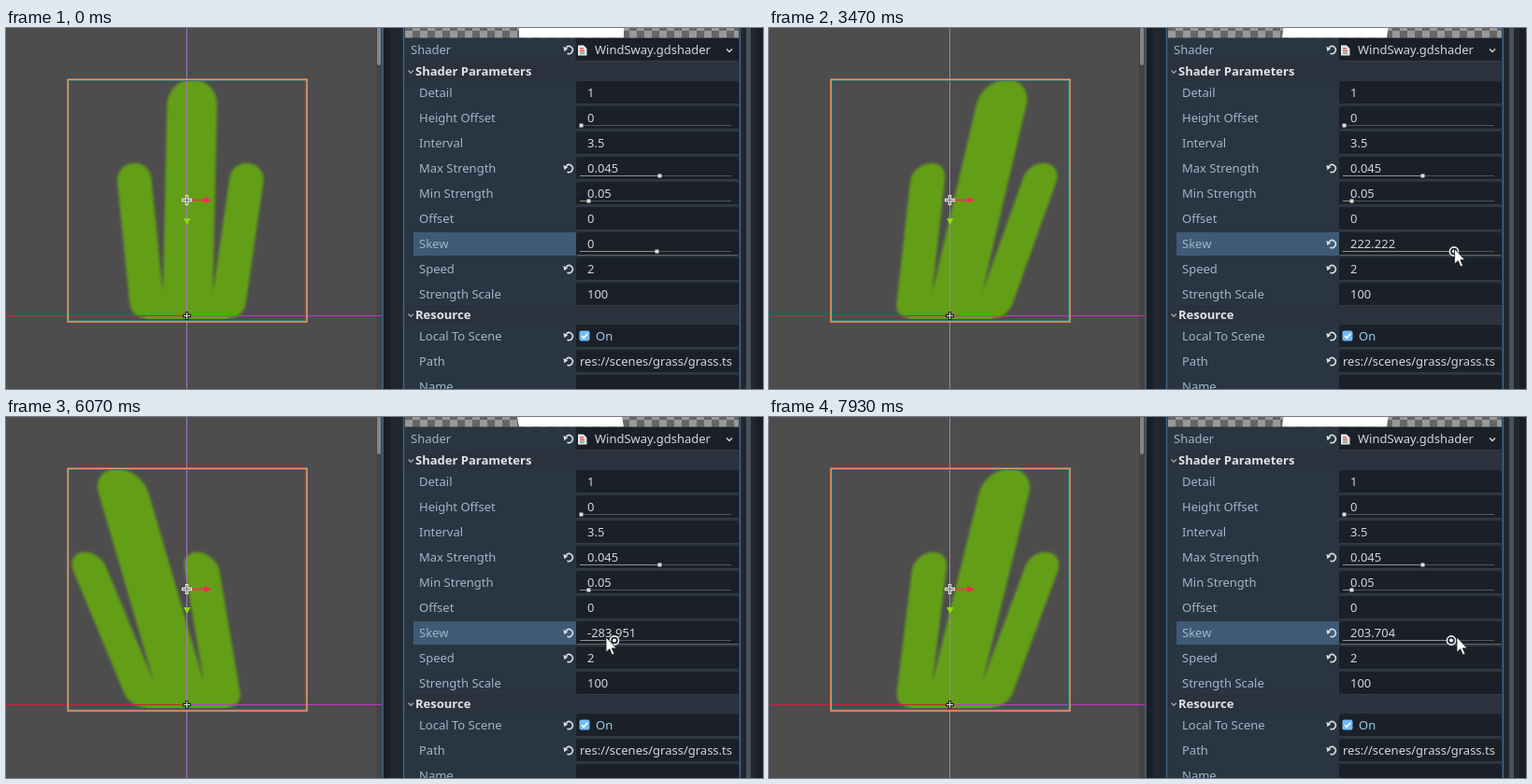
An HTML page that plays this animation: 810 px wide and 387 px high, repeating every 8 s.

```html
<!DOCTYPE html>
<html lang="en">
<head>
<meta charset="utf-8">
<title>Skew slider</title>
<style>
  html, body { margin: 0; width: 100%; height: 100%; overflow: hidden; background: #1f242c; }
  svg { display: block; }
  text { font: 13px "Noto Sans", "Open Sans", sans-serif; white-space: pre; }
  .label { fill: #a0b6c9; }
  .value { fill: #d3d6da; }
  .head { fill: #e0e3e7; font-weight: bold; }
  .field { fill: #1b2028; }
  .icon { fill: none; stroke: #dcdfe3; stroke-width: 1.6; }
  .chevron { fill: none; stroke: #9aa2ac; stroke-width: 1.4; }
</style>
</head>
<body>
<svg width="810" height="387" viewBox="0 0 810 387">
  <defs>
    <filter id="soft" filterUnits="userSpaceOnUse" x="-40" y="30" width="480" height="310">
      <feGaussianBlur stdDeviation="1.4"/>
    </filter>
    <clipPath id="frame"><rect y="55" width="397" height="257"/></clipPath>
    <clipPath id="thumb"><rect x="427" width="357" height="10.5"/></clipPath>
    <pattern id="checks" width="16" height="16" x="427" y="3" patternUnits="userSpaceOnUse">
      <rect width="16" height="16" fill="#666"/>
      <path d="M0 0h8v8h-8zM8 8h8v8h-8z" fill="#999"/>
    </pattern>
    <g id="reset">
      <path class="icon" d="M-2.6 -2.6A4 4 0 1 1 -1.5 3.7"/>
      <path d="M-5.6 -3.4L-.6 -1.6L-4.6 1.8Z" fill="#dcdfe3"/>
    </g>
  </defs>

  <!-- viewport -->
  <rect width="402" height="387" fill="#4d4d4d"/>
  <g clip-path="url(#frame)"><g filter="url(#soft)">
    <g id="plant" fill="#649f17" stroke="#649f17" stroke-linecap="round">
      <path d="M194 82V284" stroke-width="53.5"/>
      <path d="M134 163L150 293M254 163L238 293" stroke-width="36.5"/>
      <path d="M150 286h88v28h-88z" stroke="none"/>
    </g>
  </g></g>
  <rect x="396" width="6" height="387" fill="#444"/>
  <rect x="397" y="-6" width="4" height="46" rx="2" fill="#858585"/>
  <path d="M193.5 0V387" stroke="#a878c0"/>
  <path d="M0 308.5H193" stroke="#d8173f"/>
  <path d="M194 308.5H402" stroke="#c235c4"/>
  <rect x="67.5" y="56.5" width="253" height="257" fill="none" stroke="#2f7775"/>
  <rect x="66.2" y="55.2" width="255.8" height="259.8" fill="none" stroke="#ee9a63" stroke-width="1.5"/>
  <path d="M198 184.5H213" stroke="#f72a50" stroke-width="1.6"/>
  <path d="M212 181L220 184.5L212 188Z" fill="#f72a50"/>
  <path d="M190 204H197.4L193.7 211Z" fill="#8edc12"/>
  <path d="M193.5 179V190M188 184.5H199" stroke="#e4e4e4" stroke-width="3.4"/>
  <path d="M193.5 180V189M189 184.5H198" stroke="#777" stroke-width="1.2"/>
  <path d="M193.5 304V313M189 308.5H198" stroke="#222" stroke-width="3.4"/>
  <path d="M193.5 305V312M190 308.5H197" stroke="#ddd" stroke-width="1.2"/>

  <!-- inspector frame -->
  <path d="M403 0V387" stroke="#456b89" stroke-width="1.6"/>
  <rect x="404" width="7" height="387" fill="#1a1e25"/>
  <rect x="411" width="14" height="387" fill="#21272f"/>
  <rect x="425" width="361" height="387" fill="#293541"/>
  <path d="M425.5 0V387M785.5 0V387" stroke="#3e678a" stroke-width="1.4"/>
  <rect x="787" width="16" height="387" fill="#21272f"/>
  <rect x="792" width="5" height="387" fill="#4b5159"/>
  <rect x="803" width="7" height="387" fill="#1a1e25"/>
  <g clip-path="url(#thumb)">
    <rect x="427" width="357" height="11" fill="url(#checks)"/>
    <rect id="quad" x="549" y="-20" width="112" height="30.5" fill="#fff"/>
  </g>

  <g id="rows"></g>
  <rect x="609.5" y="10.5" width="1" height="26" fill="#20262e"/>
  <path d="M612 18.5h6l3.5 3.5v7.5h-9.5z" fill="#e4e6e8"/>
  <path d="M614 22h4M614 24.5h5" stroke="#e0524f" stroke-width="1.4"/>
  <path d="M614 27h5" stroke="#4fae5b" stroke-width="1.4"/>
  <path class="chevron" d="M771 22.5l3 3l3 -3" style="stroke:#d3d6da"/>
  <rect x="613.5" y="324.5" width="11" height="11" rx="2" fill="#70bafa"/>
  <path d="M616 330.2l2.2 2.2l4 -4.6" fill="none" stroke="#fff" stroke-width="1.7"/>

  <!-- live slider parts -->
  <use id="skewReset" href="#reset" x="602" y="231.5"/>
  <text id="skewText" class="value" x="622" y="236">0</text>
  <path d="M614 239.5H776" stroke="#50555d"/>
  <path id="fill" stroke="#8d9299"/>
  <rect id="knob" x="694.5" y="237.5" width="4" height="4" fill="#dcdcdc"/>
  <g id="ring">
    <circle r="4.6" fill="#1b2028" stroke="#f0f0f0" stroke-width="1.6"/>
    <circle r="2.1" fill="#f0f0f0"/>
  </g>
  <path id="cursor" d="M0 0V16.2L3.7 12.8L6.4 19L9 17.9L6.3 11.9H11.2Z"
        fill="#fff" stroke="#222" stroke-width=".9" stroke-linejoin="round"/>
</svg>
<script>
const $ = id => document.getElementById(id);

// label, centre y, value, has reset arrow, slider handle x
const ROWS = [
  ['Detail', 69, '1'],
  ['Height Offset', 96, '0', 0, 615],
  ['Interval', 123, '3.5'],
  ['Max Strength', 150, '0.045', 1, 699],
  ['Min Strength', 177, '0.05', 0, 623],
  ['Offset', 204, '0'],
  ['Skew', 231, ''],
  ['Speed', 258, '2', 1],
  ['Strength Scale', 285, '100'],
  ['Local To Scene', 330, 'On', 1],
  ['Path', 357, 'res://scenes/grass/grass.ts', 1],
  ['Name', 384, '']
];

const text = (cls, x, y, s, extra = '') =>
  `<text class="${cls}" x="${x}" y="${y + 5}" ${extra}>${s}</text>`;

const field = (y, line = '#363c45') =>
  `<rect class="field" x="610" y="${y - 12}" width="174" height="25" rx="2.5"/>
   <path d="M611 ${y + 12.5}H783" stroke="${line}"/>`;

const reset = y => `<use href="#reset" x="602" y="${y + .5}"/>`;

const slider = (x, y) =>
  `<path d="M614 ${y}H776" stroke="#50555d"/><path d="M614 ${y}H${x}" stroke="#8d9299"/>
   <rect x="${x - 1.5}" y="${y - 2}" width="4" height="4" fill="#dcdcdc"/>`;

const section = (name, y) =>
  `<rect x="427" y="${y - 10}" width="357" height="20" fill="#2b323e"/>
   <path class="chevron" d="M430.5 ${y - .5}l2.7 2.7l2.7 -2.7"/>` + text('head', 438, y, name);

function row([name, y, value, changed, handle]) {
  const skew = name === 'Skew';
  const valueX = name === 'Path' ? 614 : name === 'Local To Scene' ? 631 : 622;
  return (skew ? '<rect x="436" y="219" width="174" height="25" fill="#3e5a75"/>' : '') +
    field(y, skew ? '#6a625f' : undefined) +
    text('label', 442, y, name) +
    text('value', valueX, y, value, value === 'On' ? 'style="fill:#9acdf3"' : '') +
    (changed ? reset(y) : '') +
    (handle ? slider(handle, y + 8.5) : '');
}

$('rows').innerHTML = field(23) + text('label', 433, 23, 'Shader') + reset(23) +
  text('value', 630, 23, 'WindSway.gdshader') +
  section('Shader Parameters', 46) + section('Resource', 307) + ROWS.map(row).join('');

const POINTER_X = [
  [1270, 540], [1400, 549], [1800, 662], [2070, 691], [2600, 695], [2700, 696], [2930, 707],
  [3800, 744], [4600, 751], [4667, 756], [4867, 755], [5533, 722], [6000, 649], [6067, 642],
  [6333, 621], [6733, 620], [6800, 619], [7000, 616], [7267, 625], [7867, 728], [7933, 736]
];
const POINTER_Y = [[1270, 230.5], [2070, 236], [2600, 236], [4667, 238], [6067, 236], [6800, 235], [7933, 236]];

// Monotone cubic through [time, value] points
function curve(points, t) {
  const last = points.length - 1;
  if (t <= points[0][0]) return points[0][1];
  if (t >= points[last][0]) return points[last][1];
  const rate = i => (points[i + 1][1] - points[i][1]) / (points[i + 1][0] - points[i][0]);
  const slope = i => {
    if (i === 0 || i === last) return 0;
    const a = rate(i - 1), b = rate(i);
    return a * b > 0 ? 2 * a * b / (a + b) : 0;
  };
  const i = points.findIndex(p => p[0] > t) - 1;
  const [t0, v0] = points[i], [t1, v1] = points[i + 1];
  const d = t1 - t0, u = (t - t0) / d, w = 1 - u;
  return w * w * (1 + 2 * u) * v0 + u * u * (3 - 2 * u) * v1 +
    d * u * w * (w * slope(i) - u * slope(i + 1));
}

const LOOP = 8000, STEP = 1000 / 15;

function shear(id, slope, base) {
  $(id).setAttribute('transform', `matrix(1 0 ${-slope} 1 ${slope * base} 0)`);
}

function draw(ms) {
  // 15 steps a second, with a stall early on
  let step = Math.floor((ms + 3.4) / STEP);
  if (step > 2 && step < 19) step = 2;
  if (step === 20) step = 19;
  const t = step * STEP;

  const x = curve(POINTER_X, t), y = curve(POINTER_Y, t);
  const pull = t < 2690 ? 0 : Math.round(curve(POINTER_X, t - STEP) - 695);
  const skew = pull * 1000 / 162;
  const shift = 25.5 * Math.sin(t / 500 + 2.92) + .322 * skew;

  shear('plant', shift / 260, 315);
  shear('quad', shift / 430, 10.5);

  const pointing = step >= 19, hover = pointing && x > 612;
  const show = (id, on) => $(id).setAttribute('visibility', on ? 'visible' : 'hidden');
  show('cursor', pointing);
  show('ring', hover);
  show('knob', !hover);
  show('skewReset', pull !== 0);
  $('skewText').textContent = String(+skew.toFixed(3));
  $('fill').setAttribute('d', `M614 239.5H${697 + pull}`);
  $('ring').setAttribute('transform', `translate(${697 + pull} 239.5)`);
  $('cursor').setAttribute('transform', `translate(${x} ${y})`);
}

function tick() {
  draw(performance.now() % LOOP);
  requestAnimationFrame(tick);
}
tick();
</script>
</body>
</html>
```
